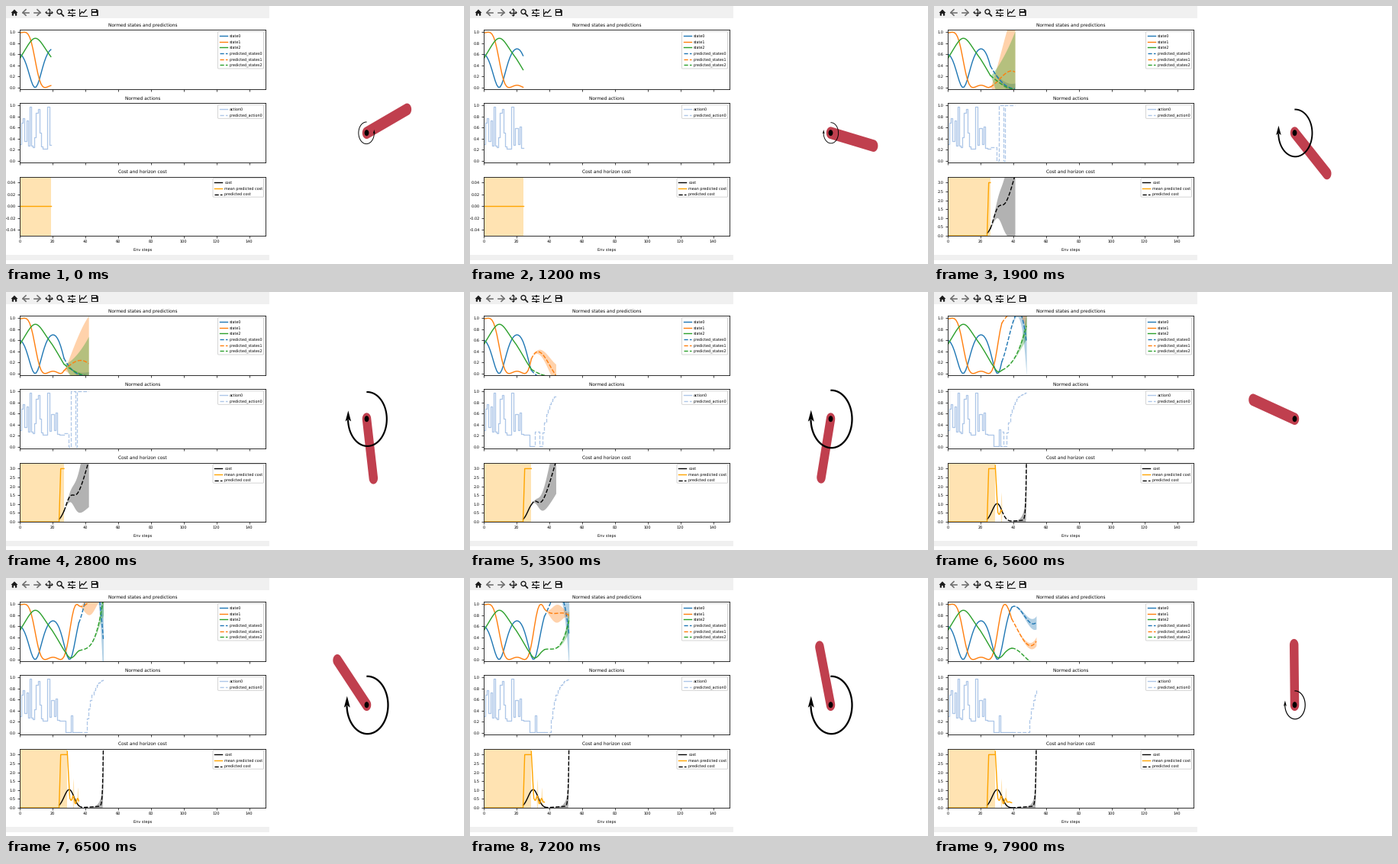
Write a matplotlib script that moves like this. It is 600 px wide and 338 px high and loops after 8000 ms.

```python
import numpy as np
import matplotlib.pyplot as plt
from matplotlib.animation import FuncAnimation
from matplotlib.patches import Circle, Ellipse, FancyBboxPatch, Polygon, Rectangle

W, H, DPI = 600, 338, 100
PX = 72 / DPI
FRAMES, INTERVAL = 80, 100
START, FIRST_PLAN, HORIZON = 19, 25, 15

BLUE, ORANGE, GREEN = "tab:blue", "tab:orange", "tab:green"
HUES = (BLUE, ORANGE, GREEN)
PALE, GOLD, ROD, INK = "#aec7e8", "orange", "#c03f4e", "#1c1c1c"

plt.rcParams.update({"font.family": "DejaVu Sans", "text.hinting": "none",
                     "axes.linewidth": .9 * PX, "axes.edgecolor": INK})


def step_of(frame):
    """Environment step on show: quick at first, slower while planning."""
    return int(np.interp(frame, [0, 12, 18, 45, 81], [19.5, 24.05, 26.1, 31.05, 40]))


# --- the swinging rod -------------------------------------------------------

def push(s):
    """Mean motor torque during step s."""
    for end, torque in ((20, .25), (28, -.5), (31, -2), (35, -1)):
        if s < end:
            return torque
    return -2


def swing(steps, sub=40):
    """Angle from hanging down and angular speed at every step."""
    angle, speed, dt = np.radians(-102), .35, .05 / sub
    path = []
    for s in range(steps):
        path.append((angle, speed))
        for _ in range(sub):
            speed += (3 * push(s) - 15 * np.sin(angle)) * dt
            angle += speed * dt
    return np.array(path).T


ANGLE, SPEED = swing(44)
STATES = np.array([(1 - np.cos(ANGLE)) / 2, (1 - np.sin(ANGLE)) / 2, .5 + SPEED / 16])
RATES = np.gradient(STATES, axis=1)


def arrow_torque(n):
    return np.interp(n, [19, 24, 26, 29, 30, 31, 34, 35, 38, 39],
                     [.38, -.36, -.82, -1, -1, 0, 0, -1, -1, -.49])


# --- plotted quantities -----------------------------------------------------

AHEAD = np.linspace(0, 1, 61)

# Per plan: state values and slopes at the horizon, final spreads, spread power.
PLAN_AT = [26, 29, 31, 36, 39]
PLAN = np.array([
    [-.02, .28, -.03, 0, -.02, 0, .1, 1.2, 1.05, 1.1],
    [-.08, -.03, -.06, 0, -.04, 0, .02, .2, .03, 1.3],
    [.7, 1.05, .7, -.15, 0, .06, .4, .4, .2, 3],
    [.37, 1.03, 1.1, -.4, -.06, .2, .9, .05, .3, 7],
    [.67, .33, -.08, .03, .05, 0, .12, .08, .01, 1.5]])

# Bursts of the exploring action: step, height, width.
BURSTS = ((1.6, .62, 1.1), (4, .5, .5), (6, .75, .6), (10.6, .78, 1.4),
          (17, .75, .4), (19.5, .45, 1.1), (22, .4, .5), (31, .3, .4))


def plan_states(n):
    """Cubic from the present state to the horizon, with a growing spread."""
    row = [np.interp(n, PLAN_AT, column) for column in PLAN.T]
    t, power = AHEAD, row[9]
    out = []
    for i in range(3):
        m0, m1 = .5 * HORIZON * RATES[i, n], HORIZON * row[3 + i]
        mid = ((1 + 2 * t) * (1 - t) ** 2 * STATES[i, n] + t * (1 - t) ** 2 * m0
               + t * t * (3 - 2 * t) * row[i] + t * t * (t - 1) * m1)
        out.append((mid, row[6 + i] * t ** power))
    # the sideways state is unsure midway while the rod lies level
    out[1][1][:] += .25 * np.exp(-((n - 36) / 1.5) ** 2) * np.sin(np.pi * t) ** 2
    return out


def actions(s):
    a = np.where(s < 28, .22, .01)
    for at, height, width in BURSTS:
        a = a + height * np.exp(-((s - at) / width) ** 2)
    return np.clip(a, 0, 1)


def plan_actions(n):
    s = n + np.arange(HORIZON + 1)
    if n < 29:
        flip = (s % 4 == 2) & (s < 36)
        return np.where(s < 30, .25, np.where(flip, 0., 1.))
    rise = 36 if n < 35 else 41 if n < 39 else 50
    hold = np.where((s >= 31) & (s < 34), .28, .01)
    return np.where(s < rise, hold, 1 - np.exp(-(s - rise + 1) / 3.4))


def cost(s):
    return 1.03 * np.exp(-((s - 30.2) / np.where(s < 30.2, 4.4, 4)) ** 2)


def plan_cost(n):
    early = n < 30
    mid = cost(n + HORIZON * AHEAD) + .1 * AHEAD + 3.3 * AHEAD ** (1.5 if early else 35)
    dev = 3.6 / np.sqrt(max(n - 25, 1)) * AHEAD ** (1.5 if early else 7)
    return mid, dev


def mean_cost(s):
    """Mean planned cost after step 29: a drop, then fading ripples."""
    wave = np.cos(2 * np.pi * (s - 32.6) / 2.8)
    fade = np.exp(-((s - 33.5) / 2.5) ** 2)
    mid = 2.6 * np.clip(1 - (s - 29) / 1.5, 0, 1) + .5 - .03 * (s - 32) + .22 * wave * fade
    return mid, 1.15 * np.maximum(wave, 0) ** 3 * fade


# --- fixed parts ------------------------------------------------------------

fig = plt.figure(figsize=(W / DPI, H / DPI), dpi=DPI, facecolor="white")


def layer(z):
    ax = fig.add_axes([0, 0, 1, 1], zorder=z)
    ax.set(xlim=(0, W), ylim=(H, 0))
    ax.axis("off")
    return ax


def plot_axes(top):
    height = 77.6
    ax = fig.add_axes([18 / W, 1 - (top + height) / H, 322 / W, height / H], zorder=1)
    ax.set(xlim=(0, 150), ylim=(-.03, 1.04), xticks=range(0, 150, 20),
           yticks=np.arange(0, 1.01, .2))
    ax.tick_params(length=2.8 * PX, width=.8 * PX, pad=2.7 * PX, labelsize=5 * PX,
                   color=INK, labelbottom=False)
    ax.set_autoscale_on(False)
    return ax


back, front = layer(0), layer(2)
ax_state, ax_action, ax_cost = (plot_axes(y) for y in (31.4, 127.4, 223.5))
ax_cost.tick_params(labelbottom=True)


def stroke(x, y, color=INK, w=1.3):
    back.plot(x, y, color=color, lw=w * PX)


def solid(points, color=INK):
    back.add_patch(Polygon(points, closed=True, fc=color, ec="none"))


def box(x0, y0, x1, y1, color=INK):
    back.add_patch(Rectangle((x0, y0), x1 - x0, y1 - y0, fc=color, ec="none"))


def toolbar():
    bar, grey = "#f0f0f0", "#6e6e6e"
    box(0, 0, 345, 16, bar)
    box(0, 326, 345, 332.5, bar)
    # home
    solid([(6.5, 9), (11, 4.5), (15.5, 9), (14.2, 9), (14.2, 12.7), (7.8, 12.7), (7.8, 9)])
    box(10.1, 10, 11.9, 12.7, bar)
    # back and forward
    for x, d in ((22, 1), (45, -1)):
        stroke([x, x + 8 * d], [8.5, 8.5], grey, 1.6)
        stroke([x + 4 * d, x, x + 4 * d], [4.7, 8.5, 12.3], grey, 1.6)
    # pan
    stroke([53, 60], [8.5, 8.5])
    stroke([56.5, 56.5], [5, 12])
    for d in np.array([(1, 0), (-1, 0), (0, 1), (0, -1)]):
        base, side = (56.5, 8.5) + 3 * d, 2.2 * d[::-1]
        solid([base + 2.3 * d, base + side, base - side])
    # zoom
    back.add_patch(Circle((70, 7.5), 3, fc="none", ec=INK, lw=1.4 * PX))
    stroke([72.2, 75.3], [9.7, 13], w=1.8)
    # sliders
    for y, x in ((5, 86.5), (8.5, 83), (12, 87)):
        stroke([80.5, 90], [y, y], w=1.1)
        box(x - 1, y - 1.5, x + 1, y + 1.5)
    # chart
    stroke([95.5, 95.5, 105.5], [4, 12.7, 12.7], w=1.1)
    stroke([97, 99.5, 101.5, 105], [10.5, 7.5, 9, 5], w=1.4)
    # save
    solid([(111.8, 4), (119, 4), (120.8, 5.8), (120.8, 13), (111.8, 13)])
    box(113.2, 5, 118, 7.3, bar)
    box(113.4, 9.2, 119.2, 12, bar)


def legend(x0, y0, y1, rows):
    front.add_patch(FancyBboxPatch((x0 + 1, y0 + 1), 335.5 - x0, y1 - y0 - 2,
                                   boxstyle="round,pad=1", fc=(1, 1, 1, .8),
                                   ec="#cccccc", lw=.8 * PX))
    for i, (name, color, dash) in enumerate(rows):
        y = y0 + 5.6 + 7.65 * i
        front.plot([x0 + 2.2, x0 + 12.2], [y, y], dash, color=color, lw=1.4 * PX)
        front.text(x0 + 15.3, y + 1.7, name, size=4.85 * PX, va="baseline")


def caption(y, text, size):
    back.text(179.3, y, text, size=size * PX, ha="center", va="baseline")


toolbar()
caption(26.4, "Normed states and predictions", 5.9)
caption(122.5, "Normed actions", 5.9)
caption(218.5, "Cost and horizon cost", 5.9)
caption(320.5, "Env steps", 4.95)
legend(277.5, 33.5, 82, [(f"state{i}", c, "-") for i, c in enumerate(HUES)]
       + [(f"predicted_states{i}", c, "--") for i, c in enumerate(HUES)])
legend(277.5, 129.6, 147.3, [("action0", PALE, "-"), ("predicted_action0", PALE, "--")])
legend(271, 225.7, 250.2, [("cost", "black", "-"), ("mean predicted cost", GOLD, "-"),
                           ("predicted cost", "black", "--")])

# --- moving parts -----------------------------------------------------------

live = []


def line(ax, x, y, color, dash="-", w=1.4, **kw):
    live.extend(ax.plot(x, y, dash, color=color, lw=w * PX, **kw))


def band(ax, x, mid, dev, color, alpha=.3):
    live.append(ax.fill_between(x, mid - dev, mid + dev, color=color, alpha=alpha, lw=0))


def patch(p):
    live.append(back.add_patch(p))


def draw_states(n):
    for y, c in zip(STATES, HUES):
        line(ax_state, range(n + 1), y[:n + 1], c)
    if n >= FIRST_PLAN:
        x = n + HORIZON * AHEAD
        for (mid, dev), c in zip(plan_states(n), HUES):
            band(ax_state, x, mid, dev, c, .35)
            line(ax_state, x, mid, c, "--")


def draw_actions(n):
    style = dict(color=PALE, w=1.3, drawstyle="steps-post")
    past = actions(np.arange(n))
    line(ax_action, range(n + 1), [*past, past[-1]], **style)
    if n >= FIRST_PLAN:
        line(ax_action, n + np.arange(HORIZON + 1), plan_actions(n), dash="--", **style)


def draw_cost(n):
    planning = n >= FIRST_PLAN
    if planning:
        ax_cost.set(ylim=(0, 3.34), yticks=np.arange(0, 3.1, .5))
    else:
        ax_cost.set(ylim=(-.05, .05), yticks=np.arange(-2, 3) * .02)
    ax_cost.yaxis.set_major_formatter("{x:.1f}" if planning else "{x:.2f}")

    flat = min(n, 29)
    band(ax_cost, [0, flat], np.zeros(2), np.full(2, 9.), GOLD)
    if planning:
        past = np.linspace(24, n, 4 * (n - 24) + 1)
        line(ax_cost, past, cost(past), "black")
        mid, dev = plan_cost(n)
        x = n + HORIZON * AHEAD
        band(ax_cost, x, mid, dev, "black")
        line(ax_cost, x, mid, "black", "--")
    s = np.arange(flat + 1)
    line(ax_cost, s, np.where(s <= 24, 0, 3), GOLD)
    if n > flat:
        t = np.linspace(flat, n, 5 * (n - flat) + 1)
        mid, dev = mean_cost(t)
        band(ax_cost, t, mid, dev, GOLD)
        line(ax_cost, t, mid, GOLD)


PIVOT = np.array([472.5, 166.2])
UNIT = np.array([57.5, -78.5])


def draw_rod(n):
    a = ANGLE[n + 2] - np.pi / 2
    t = np.linspace(np.pi / 2, 3 * np.pi / 2, 20)
    x = np.r_[.1 * np.cos(t), 1 - .1 * np.cos(t)]
    y = np.r_[.1 * np.sin(t), -.1 * np.sin(t)]
    rod = np.c_[x * np.cos(a) - y * np.sin(a), x * np.sin(a) + y * np.cos(a)]
    patch(Polygon(PIVOT + rod * UNIT, closed=True, fc=ROD, ec="none", zorder=3))
    patch(Ellipse(PIVOT, 5.8, 8, fc="black", ec="none", zorder=4))

    u = arrow_torque(n)
    if u == 0:
        return
    size = np.array([-u, abs(u)])
    t = np.radians(np.linspace(90, -177, 80))
    arc = PIVOT + np.c_[1 + 27 * np.cos(t), .3 - 37.7 * np.sin(t)] * size
    line(back, arc[:, 0], arc[:, 1], "black", w=2.2 * abs(u) + .1, zorder=5)
    head = np.array([(-25.7, -11.5), (-21.7, 3.5), (-25.7, .5), (-29.7, 3.5)])
    patch(Polygon(PIVOT + head * size, closed=True, fc="black", ec="none", zorder=5))


def draw(frame):
    while live:
        live.pop().remove()
    n = step_of(frame)
    draw_states(n)
    draw_actions(n)
    draw_cost(n)
    # The rod refreshes one frame ahead of the plots.
    draw_rod(step_of(frame + 1))
    return []


def init():
    return draw(0)


anim = FuncAnimation(fig, draw, frames=FRAMES, init_func=init, interval=INTERVAL,
                     repeat=True, repeat_delay=0, blit=False)
plt.show()
```
